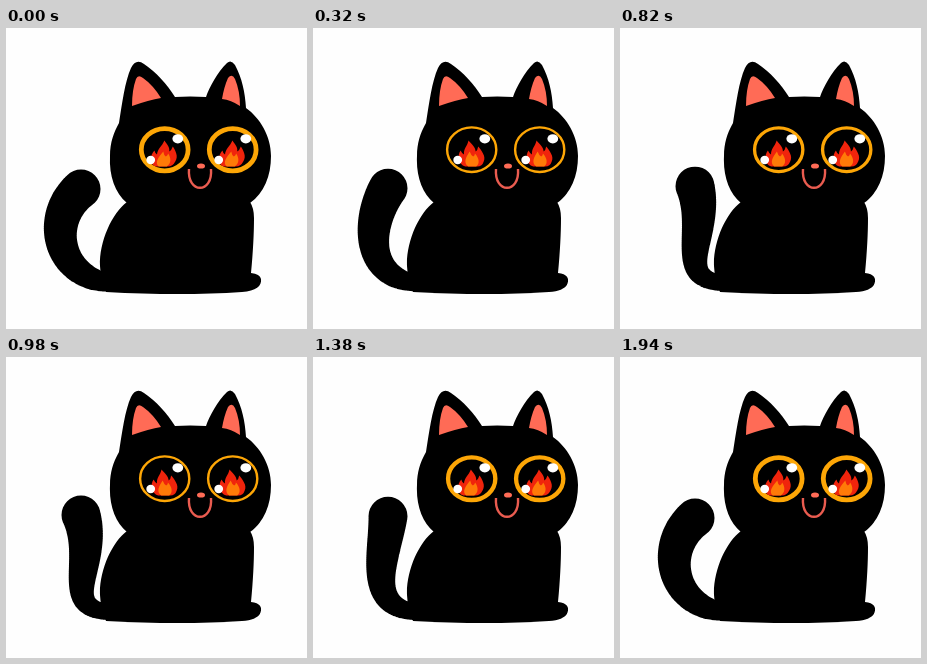
An HTML page that plays this animation: 301 px wide and 301 px high, repeating every 1960 ms.

```html
<!DOCTYPE html>
<html lang="en">
<head>
<meta charset="utf-8">
<title>Black cat</title>
<style>
html, body { margin: 0; width: 100%; height: 100%; overflow: hidden; background: #fefefe; }
svg { display: block; width: 100vw; height: 100vh; }
</style>
</head>
<body>
<svg viewBox="0 0 301 301">
  <path id="tail"/>
  <!-- body with foot, then head with ears -->
  <path d="M121 174C106 185 93 214 94 238Q95 252 97 256L100 264Q175 268 236 264C250 263 256 258 255 251Q254 246 245 245C247 224 248 205 248 190Q248 180 244 174Z"/>
  <path d="M104 128C104 114 108 104 113 95C116 76 119 53 125 40Q130 30 138 36C150 44 161 56 169 69Q184 68 200 69C203 60 212 43 221 35Q225 31 229 37C236 50 239 64 240 80C254 90 265 108 265 128C265 148 258 165 244 175Q180 190 121 175C109 165 103 148 104 128Z"/>
  <g fill="#ff6b56">
    <path d="M130 51Q132 46 137 50Q147 57 155 70Q143 72 126 78Q126 62 130 51Z"/>
    <path d="M222 50Q226 45 229 51Q234 63 234 78Q225 72 216 71Q218 59 222 50Z"/>
    <ellipse cx="195" cy="138" rx="4" ry="2.600"/>
  </g>
  <path d="M183 141C181 166 207 166 205 141" fill="none" stroke="#ea5c50" stroke-width="2.400"/>
  <g id="eye">
    <ellipse id="ring" cx="158.700" cy="121.700" stroke="#fda606"/>
    <g id="flame">
      <path fill="#f0240c" d="M-7 12C-14 10-14 1-10-4Q-9-1-7 0C-7-6-3-8-1-14C2-10 5-8 5-3Q7-4 8-8C11-4 15 2 12 7Q10 12 5 12Z"/>
      <path fill="#ff7a08" d="M-4 12C-9 8-5 2-1-3Q0 1 2 2Q4 1 4-1C8 4 8 9 4 12Z"/>
    </g>
    <g fill="#fff">
      <ellipse cx="171.800" cy="110.800" rx="5.400" ry="4.600"/>
      <ellipse cx="144.700" cy="132" rx="4.400" ry="4.200"/>
    </g>
  </g>
  <use href="#eye" x="68"/>
</svg>
<script>
const LOOP = 1960;
const [tail, ring, flame] = ['tail', 'ring', 'flame'].map(id => document.getElementById(id));
const mix = (a, b, k) => a + (b - a) * k;

// Bezier spines of the tail, root to tip, at both ends of its swing
const curled = { x: [102, 50, 40, 75], y: [255, 247, 190, 161] };
const raised = { x: [102, 52, 92, 75], y: [255, 250, 205, 158] };

const bezier = ([a, b, c, d], t) => {
  const u = 1 - t;
  return u * u * u * a + 3 * u * u * t * b + 3 * u * t * t * c + t * t * t * d;
};

// Overlapping discs along the spine, growing towards the tip
function tailPath(lift) {
  const spine = axis => curled[axis].map((v, i) => mix(v, raised[axis][i], lift));
  const xs = spine('x'), ys = spine('y'), steps = 60;
  let d = '';
  for (let i = 0; i <= steps; i++) {
    const t = i / steps;
    const r = 8 + 11.5 * t ** mix(0.6, 1.1, lift);
    d += `M${bezier(xs, t) - r} ${bezier(ys, t)}a${r} ${r} 0 1 0 ${2 * r} 0a${r} ${r} 0 1 0 ${-2 * r} 0`;
  }
  return d;
}

function draw(ms) {
  const angle = 2 * Math.PI * (ms + 20) / LOOP;
  tail.setAttribute('d', tailPath((1 - Math.cos(angle)) / 2));

  // The irises pulse three times per tail swing
  const pulse = Math.cos(3 * angle);
  const width = 3.6 + 1.2 * pulse;
  ring.setAttribute('stroke-width', width);
  ring.setAttribute('rx', 25.8 - width / 2);
  ring.setAttribute('ry', 23.5 - width / 2);
  flame.setAttribute('transform', `translate(158 126.500) skewX(${-6 * pulse})`);
}

const start = performance.now();
function tick() {
  draw(performance.now() - start);
  requestAnimationFrame(tick);
}
tick();
</script>
</body>
</html>
```
